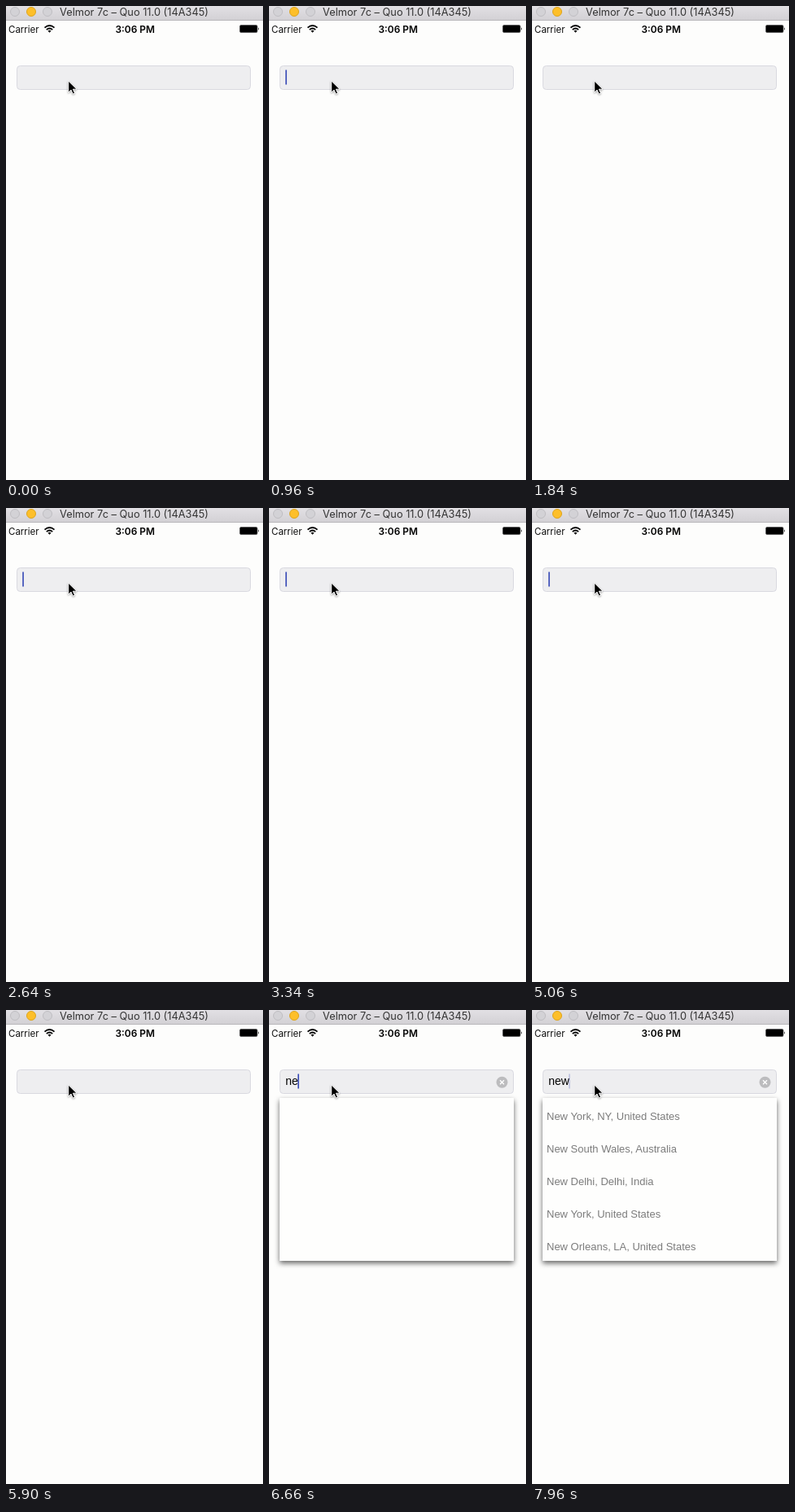
These frames come from a looping animation (316 px wide and 582 px high, 8000 ms). An HTML page:

```html
<!DOCTYPE html>
<html lang="en">
<head>
<meta charset="utf-8">
<title>Place search</title>
<style>
  html, body { margin: 0; width: 100%; height: 100%; overflow: hidden; background: #fdfdfc; }
  svg { display: block; width: 316px; height: 582px; }
  text { font-family: Inter, Roboto, sans-serif; white-space: pre; }
  .plain { font-family: "Liberation Sans", Arial, sans-serif; }
  #panel rect { filter: drop-shadow(0 3px 3px rgba(0, 0, 0, .6)); }
  #pointer { filter: drop-shadow(0 1px 1px rgba(0, 0, 0, .35)); }
</style>
</head>
<body>
<svg viewBox="0 0 316 582">
  <defs>
    <linearGradient id="bar" x2="0" y2="1">
      <stop stop-color="#e2e0e4"/>
      <stop offset="1" stop-color="#d2d0d4"/>
    </linearGradient>
  </defs>
  <rect width="316" height="582" fill="#fdfdfc"/>

  <!-- window title bar -->
  <rect width="316" height="18" fill="url(#bar)"/>
  <rect y="17" width="316" height="1" fill="#b8b6ba"/>
  <g stroke-width="1">
    <circle cx="11" cy="7" r="5.5" fill="#d3d2d6" stroke="#bfbec2"/>
    <circle cx="31" cy="7" r="5.5" fill="#fdbf2a" stroke="#dda41c"/>
    <circle cx="51" cy="7" r="5.5" fill="#d3d2d6" stroke="#bfbec2"/>
  </g>
  <text x="66" y="12" font-size="12.8" fill="#333">Velmor 7c – Quo 11.0 (14A345)</text>

  <!-- status bar -->
  <text x="3" y="32.5" font-size="11.5" fill="#111">Carrier</text>
  <g fill="none" stroke="#000" stroke-width="1.7">
    <path d="M47.5 26.7Q53.5 21.3 59.5 26.7M49.8 29.2Q53.5 25.8 57.2 29.2"/>
    <path d="M51.5 30.6Q53.5 29 55.5 30.6L53.5 32.8Z" fill="#000" stroke="none"/>
  </g>
  <text x="158.7" y="32.5" font-size="11.9" font-weight="600" text-anchor="middle">3:06 PM</text>
  <rect x="287.5" y="23.5" width="21.5" height="9" rx="1.5" fill="#000" stroke="#555" stroke-width=".8"/>
  <path d="M310 26.3q1.7 1.7 0 3.4z"/>

  <!-- search field -->
  <rect x="13.5" y="73.5" width="287" height="29" rx="4" fill="#eeeef0" stroke="#d9d9e0"/>
  <text id="query" class="plain" x="20.3" y="92" font-size="14"></text>
  <rect id="caret" y="78.5" width="1.7" height="18" fill="#3f50b8"/>
  <g id="clear">
    <circle cx="286.5" cy="88.8" r="7" fill="#bcbcbe"/>
    <path d="M284 86.3l5 5m0-5l-5 5" stroke="#fff" stroke-width="1.3"/>
  </g>

  <g id="panel">
    <rect x="13" y="108" width="288" height="200" fill="#fefefd"/>
    <g id="results" class="plain" font-size="13" fill="#7c7c7c"></g>
  </g>

  <path id="pointer" d="M76.7 92v14.2l3.3-3.1 2.2 5 2.4-1-2.2-4.9h4.6z"
        fill="#000" stroke="#fff" stroke-width="1" stroke-linejoin="round"/>
</svg>
<script>
  const LOOP = 8000, BLINK = 2000, RESULTS_AT = 7700;
  const keys = [
    { at: 460, text: "", caretX: 20.2 },
    { at: 6100, text: "n", caretX: 27.8 },
    { at: 6420, text: "ne", caretX: 35.3 },
    { at: 6740, text: "new", caretX: 45.2 },
  ];
  const places = [
    "New York, NY, United States",
    "New South Wales, Australia",
    "New Delhi, Delhi, India",
    "New York, United States",
    "New Orleans, LA, United States",
  ];

  const el = id => document.getElementById(id);
  const show = (id, on) => { el(id).style.display = on ? "" : "none"; };
  const clamp = v => Math.min(1, Math.max(0, v));

  places.forEach((place, i) => {
    const row = document.createElementNS("http://www.w3.org/2000/svg", "text");
    row.setAttribute("class", "plain");
    row.setAttribute("x", 18);
    row.setAttribute("y", 135 + 40 * i);
    row.textContent = place;
    el("results").append(row);
  });

  // Solid for half the cycle, then fade out, pause and fade back in.
  function caretOpacity(elapsed) {
    const phase = ((elapsed / BLINK) % 1 + 1) % 1;
    return phase < 0.75 ? clamp((0.65 - phase) / 0.15) : clamp((phase - 0.85) / 0.15);
  }

  function draw(t) {
    const key = keys.findLast(k => t >= k.at) || keys[0];
    el("query").textContent = key.text;
    el("caret").setAttribute("x", key.caretX);
    el("caret").setAttribute("opacity", caretOpacity(t - key.at));
    show("clear", key.text);
    show("panel", key.text);
    show("results", t >= RESULTS_AT);
  }

  const start = performance.now();
  function tick() {
    draw((performance.now() - start) % LOOP);
    requestAnimationFrame(tick);
  }
  tick();
</script>
</body>
</html>
```
